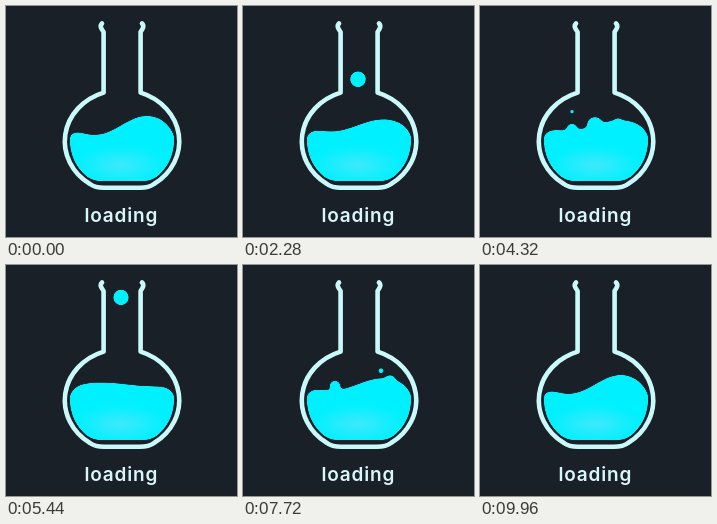
Recreate the animation shown at these times as an HTML page. Size 231 px wide and 231 px high, loop 10 s.

```html
<!DOCTYPE html>
<html lang="en">
<head>
<meta charset="utf-8">
<title>loading</title>
<style>
  html, body { margin: 0; height: 100%; overflow: hidden; background: #1a2028; }
  svg { display: block; width: 100vw; height: 100vh; }
  text { font: 600 19px Inter, sans-serif; letter-spacing: .8px; fill: #d9f7f9; }
</style>
</head>
<body>
<svg viewBox="0 0 231 231">
  <defs>
    <radialGradient id="cyan" gradientUnits="userSpaceOnUse" cx="0" cy="0" r="1"
                    gradientTransform="translate(115 159) scale(46 19)">
      <stop stop-color="#3fe9fb"/>
      <stop offset="1" stop-color="#00f0ff"/>
    </radialGradient>
    <filter id="goo" filterUnits="userSpaceOnUse" x="0" y="0" width="231" height="231"
            color-interpolation-filters="sRGB">
      <feGaussianBlur stdDeviation="2"/>
      <feColorMatrix values="1 0 0 0 0  0 1 0 0 0  0 0 1 0 0  0 0 0 10 -4.4"/>
    </filter>
  </defs>
  <g id="liquid" fill="url(#cyan)" filter="url(#goo)"><path id="pool"/></g>
  <path fill="none" stroke="#c9f9fb" stroke-width="4.6" stroke-linecap="round" stroke-linejoin="round"
        d="M96 17.5C93.500 20 95 22.500 97.600 26V86.600A57.300 51.500 0 0 0 84 178Q89 181.800 98 181.800
           H134Q143 181.800 148 178A57.300 51.500 0 0 0 134.600 86.600V26C137 22.500 138.500 20 136 17.500"/>
  <text x="78.500" y="216">loading</text>
</svg>
<script>
const LOOP = 10000, SWAY = 2000;
const LEFT = 64, RIGHT = 168, RIM = 134, DEPTH = 150;
const liquid = document.getElementById('liquid');
const pool = document.getElementById('pool');
const walls = 'C168 149 162 160 154 168Q147 175 138 175H94Q85 175 78 168C70 160 64 149 64 134Z';
const bubbles = [];

// One column of equal bubbles, one for each start time
function column(x, radius, rise, ...starts) {
  for (const start of starts) {
    const dot = document.createElementNS('http://www.w3.org/2000/svg', 'circle');
    dot.setAttribute('cx', x);
    liquid.append(dot);
    bubbles.push({ dot, radius, rise, start });
  }
}
column(115, 8, 92, 1200, 2200);
column(115, 8, 129, 4110);
column(115, 5, 50, 6224, 8300);
column(92, 5.5, 45, 3066, 3886, 5647, 7240);
column(132, 4.4, 46, 2248, 5740);
column(138, 4.4, 46, 3854, 6836);
column(147, 6, 48, 2650, 7113);

// A sine swinging from side to side on a dome that drops at the glass
function surface(x, tilt) {
  const u = (2 * x - LEFT - RIGHT) / (RIGHT - LEFT);
  return 119 + 2 * u ** 2 + 9 * u ** 10 - 9.5 * tilt * Math.sin(Math.PI * u);
}

function draw(t) {
  const tilt = Math.cos(2 * Math.PI * t / SWAY);
  let path = `M${LEFT} ${RIM}`;
  for (let x = LEFT; x <= RIGHT; x += 2) path += `L${x} ${surface(x, tilt)}`;
  pool.setAttribute('d', `${path}L${RIGHT} ${RIM}${walls}`);

  // Larger bubbles live longer; all slow down and shrink as they rise
  for (const { dot, radius, rise, start } of bubbles) {
    const p = (t - start) / (300 * radius);
    const active = p > 0 && p < 1;
    dot.setAttribute('r', active ? radius * Math.min(1, 2.2 * (1 - p)) : 0);
    if (active) dot.setAttribute('cy', DEPTH - rise * (1 - (1 - p) ** 3));
  }
}

const origin = performance.now();
function tick() {
  draw((performance.now() - origin) % LOOP);
  requestAnimationFrame(tick);
}
tick();
</script>
</body>
</html>
```
